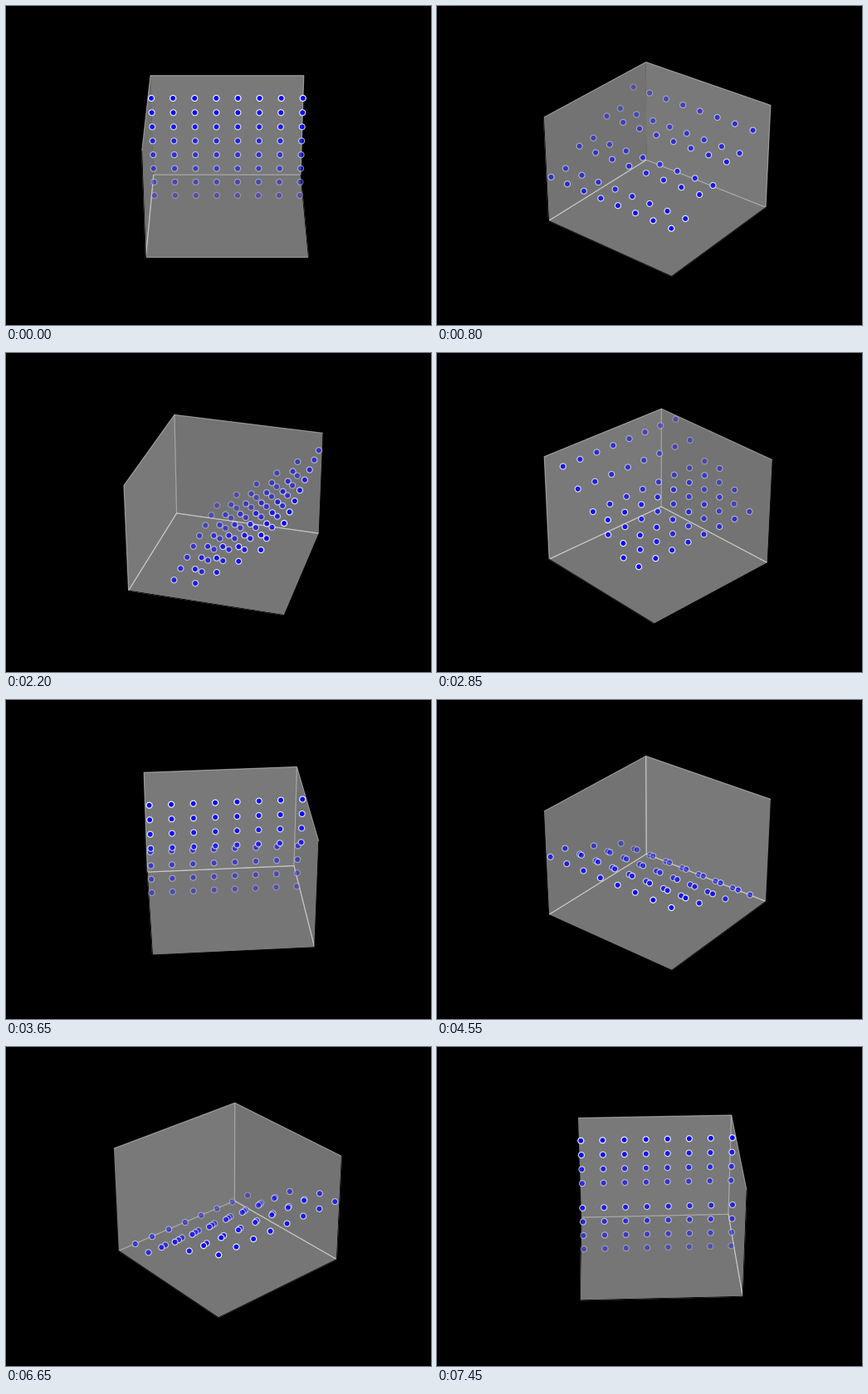
These frames come from a looping animation (512x384 px, 7500 ms). A matplotlib script:

```python
import numpy as np
import matplotlib.pyplot as plt
from matplotlib.animation import FuncAnimation

N = 8            # voxels per side
FRAMES = 150
TURNS = 3        # plane rotations per loop
SLICE = 2        # x layer that is lit before rotation
MID = (N - 1) / 2

gx, gy, gz = (g.ravel() for g in np.mgrid[0:N, 0:N, 0:N])


def lit_voxels(angle):
    """Rotate the lit layer about the y axis, sampling back into the grid."""
    c, s = np.cos(angle), np.sin(angle)
    x, z = gx - MID, gz - MID
    src_x = np.floor(x * c - z * s + MID + 1e-9)
    src_z = np.floor(x * s + z * c + MID + 1e-9)
    on = (src_x == SLICE) & (src_z >= 0) & (src_z < N)
    return gx[on], gy[on], gz[on]


fig = plt.figure(figsize=(6.4, 4.8), dpi=80, facecolor="black")
ax = fig.add_subplot(projection="3d", facecolor="black")
pad = (N - 1) / 48
ax.set(xlim=(-pad, N - 1 + pad), ylim=(-pad, N - 1 + pad),
       zlim=(-pad, N - 1 + pad), xticks=[], yticks=[], zticks=[])

dots = []


def draw(frame):
    while dots:
        dots.pop().remove()
    turn = 2 * np.pi * frame / FRAMES
    dots.append(ax.scatter(*lit_voxels(TURNS * turn), s=40,
                           c="blue", edgecolors="white"))
    ax.view_init(elev=30, azim=np.degrees(turn))
    return dots


anim = FuncAnimation(fig, draw, frames=FRAMES, init_func=lambda: draw(0),
                     interval=50, repeat=True, repeat_delay=0)
plt.show()
```
